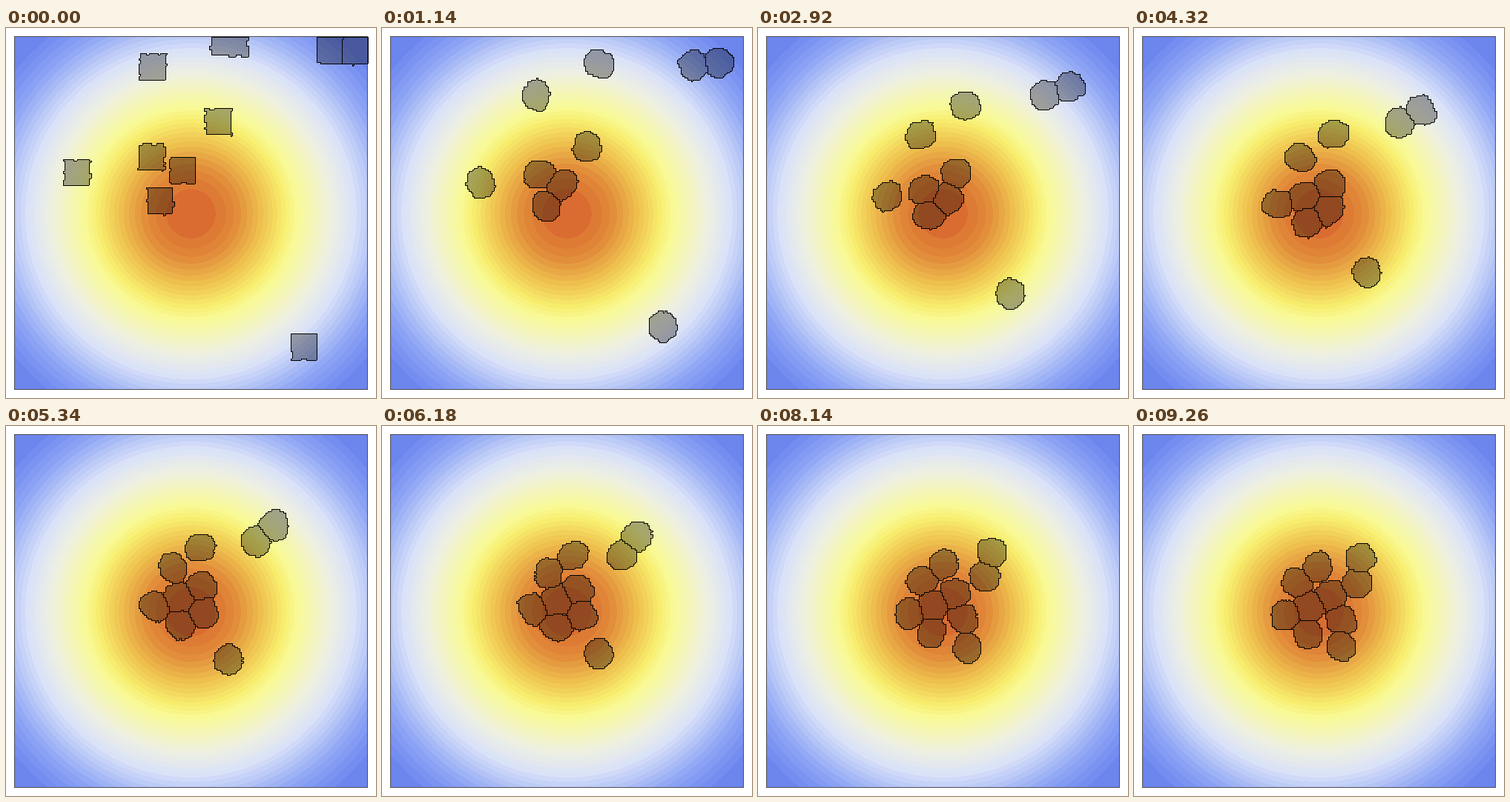
Write a matplotlib script that moves like this. It is 499 by 499 pixels and loops after 9.28 s.

```python
import numpy as np
import matplotlib.pyplot as plt
from matplotlib.animation import FuncAnimation
from matplotlib.colors import LinearSegmentedColormap

STAGE, LOW, HIGH = 499, 11, 487
SITES = 200
SITE = (HIGH - LOW) / SITES
STEPS, LOOP, TICK = 200, 9280, 20

# A bell-shaped signal, drawn in discrete levels.
PEAK, SIGMA, LEVELS = np.array([249.0, 250.0]), 165, 50
RIM = 310
PALETTE = [(0, "#d65a2c"), (60, "#e18a3a"), (95, "#eec04e"), (125, "#f7ec6c"),
           (143, "#f9fa96"), (190, "#eef0e2"), (220, "#dae2f8"),
           (270, "#8ea5f5"), (RIM, "#6c86ee")]

# Where each cell starts, and its place in the final cluster.
START = np.array([(95, 194), (197, 51), (300, 12), (437, 28), (469, 29),
                  (195, 173), (285, 125), (207, 232), (237, 191), (401, 429)], float)
HOME = np.array([(206, 257), (216, 216), (241, 197), (287, 230), (281, 196),
                 (238, 245), (262, 235), (232, 284), (283, 262), (271, 290)], float)
COUNT = len(START)
SPEED, SETTLE = 1.6, 150
CONTACT, PUSH = 34, 0.04

AREA = 1230 / SITE ** 2
REACH = 17
SHADE = 0.67


def make_field():
    axis = np.arange(STAGE)
    dist = np.hypot(axis - PEAK[0], axis[:, None] - PEAK[1])
    fall = 1 - np.exp(-dist ** 2 / (2 * SIGMA ** 2))
    level = (np.floor(fall * LEVELS) + 0.5) / LEVELS
    ring = SIGMA * np.sqrt(-2 * np.log(1 - level))
    cmap = LinearSegmentedColormap.from_list(
        "field", [(r / RIM, colour) for r, colour in PALETTE], N=512)
    rgb = (cmap(ring / RIM)[..., :3] * 255).round()
    field = np.full((STAGE, STAGE, 3), 255, np.uint8)
    field[LOW:HIGH + 1, LOW:HIGH + 1] = 80
    inner = slice(LOW + 1, HIGH)
    field[inner, inner] = rgb[inner, inner]
    return field


def migrate():
    """Cells climb the signal's slope, push on contact and settle at home."""
    pos, track = START.copy(), []
    for step in range(STEPS):
        track.append(pos)
        way = PEAK + (HOME - PEAK) * min(1, step / SETTLE) - pos
        far = np.linalg.norm(way, axis=1, keepdims=True)
        pull = SPEED * way / SIGMA * np.exp(0.5 - far ** 2 / (2 * SIGMA ** 2))
        gap = pos[:, None] - pos
        apart = np.linalg.norm(gap, axis=2, keepdims=True) + 1e-9
        push = PUSH * np.maximum(CONTACT - apart, 0) * gap / apart
        pos = pos + pull + push.sum(axis=1)
    return track


GRID = LOW + 0.5 + SITE * (np.arange(SITES) + 0.5)
rng = np.random.default_rng(7)
WAVES = [(k, rng.uniform(.02, .16, COUNT) / k, rng.uniform(0, 2 * np.pi, COUNT),
          rng.uniform(-.09, .09, COUNT)) for k in (2, 3, 4)]


def window(centre):
    mid = int((centre - LOW) / SITE)
    return slice(max(mid - REACH, 0), min(mid + REACH + 1, SITES))


def distance(cell, step, centre):
    """Distance from a cell's centre: boxy at first, then a wobbling blob."""
    x, y = centre
    rows, cols = window(y), window(x)
    dx, dy = GRID[cols][None, :] - x, GRID[rows][:, None] - y
    angle = np.arctan2(dy, dx)
    lumps = 1 + sum(amp[cell] * np.cos(k * angle + phase[cell] + rate[cell] * step)
                    for k, amp, phase, rate in WAVES)
    box = np.maximum(abs(dx), abs(dy))
    w = max(0, 1 - step / 10)
    return (rows, cols), w * box + (1 - w) * np.hypot(dx, dy) * lumps


def ragged_edge(step):
    noise = np.random.default_rng(step).normal(size=(SITES, SITES))
    for axis in (0, 1):
        noise = noise + np.roll(noise, 1, axis) + np.roll(noise, -1, axis)
    return 1 + noise * 0.01


def assign(shapes, sizes, edge):
    owner = np.full((SITES, SITES), -1, np.int8)
    best = edge.copy()
    for cell, (part, dist) in enumerate(shapes):
        near = dist / sizes[cell]
        won = near < best[part]
        best[part][won] = near[won]
        owner[part][won] = cell
    return owner


def grow():
    """Cells keep their area while they crowd together."""
    sizes = np.full(COUNT, 18.0)
    maps = []
    for step, pos in enumerate(migrate()):
        shapes = [distance(c, step, pos[c]) for c in range(COUNT)]
        edge = ragged_edge(step)
        for _ in range(8 if step == 0 else 4):
            owner = assign(shapes, sizes, edge)
            area = np.bincount(owner.ravel() + 1, minlength=COUNT + 1)[1:]
            sizes = np.clip(sizes * (AREA / np.maximum(area, 1)) ** 0.35, 15, 36)
        maps.append(assign(shapes, sizes, edge))
    return maps


FIELD = make_field()
SHADED = (FIELD * SHADE).astype(np.uint8)
MAPS = grow()
PICK = np.minimum((np.arange(HIGH - LOW) / SITE).astype(int), SITES - 1)
INNER = slice(LOW + 1, HIGH + 1)


def step_at(ms):
    """Three steps every 140 ms, the middle one held longer."""
    turn, rest = divmod(ms, 140)
    return min(3 * turn + (rest >= 20) + (rest >= 120), STEPS - 1)


def picture(step):
    owner = np.full((STAGE, STAGE), -1, np.int8)
    owner[INNER, INNER] = MAPS[step][PICK[:, None], PICK]
    image = FIELD.copy()
    inside = owner >= 0
    image[inside] = SHADED[inside]
    line = np.zeros(owner.shape, bool)
    line[1:] |= owner[1:] != owner[:-1]
    line[:, 1:] |= owner[:, 1:] != owner[:, :-1]
    image[line] = 0
    return image


fig = plt.figure(figsize=(STAGE / 100, STAGE / 100), dpi=100)
view = fig.figimage(picture(0), origin="upper")


def update(i):
    view.set_data(picture(step_at(i * TICK)))
    return [view]


anim = FuncAnimation(fig, update, frames=LOOP // TICK, interval=TICK,
                     repeat=True, repeat_delay=0, blit=False)
plt.show()
```
